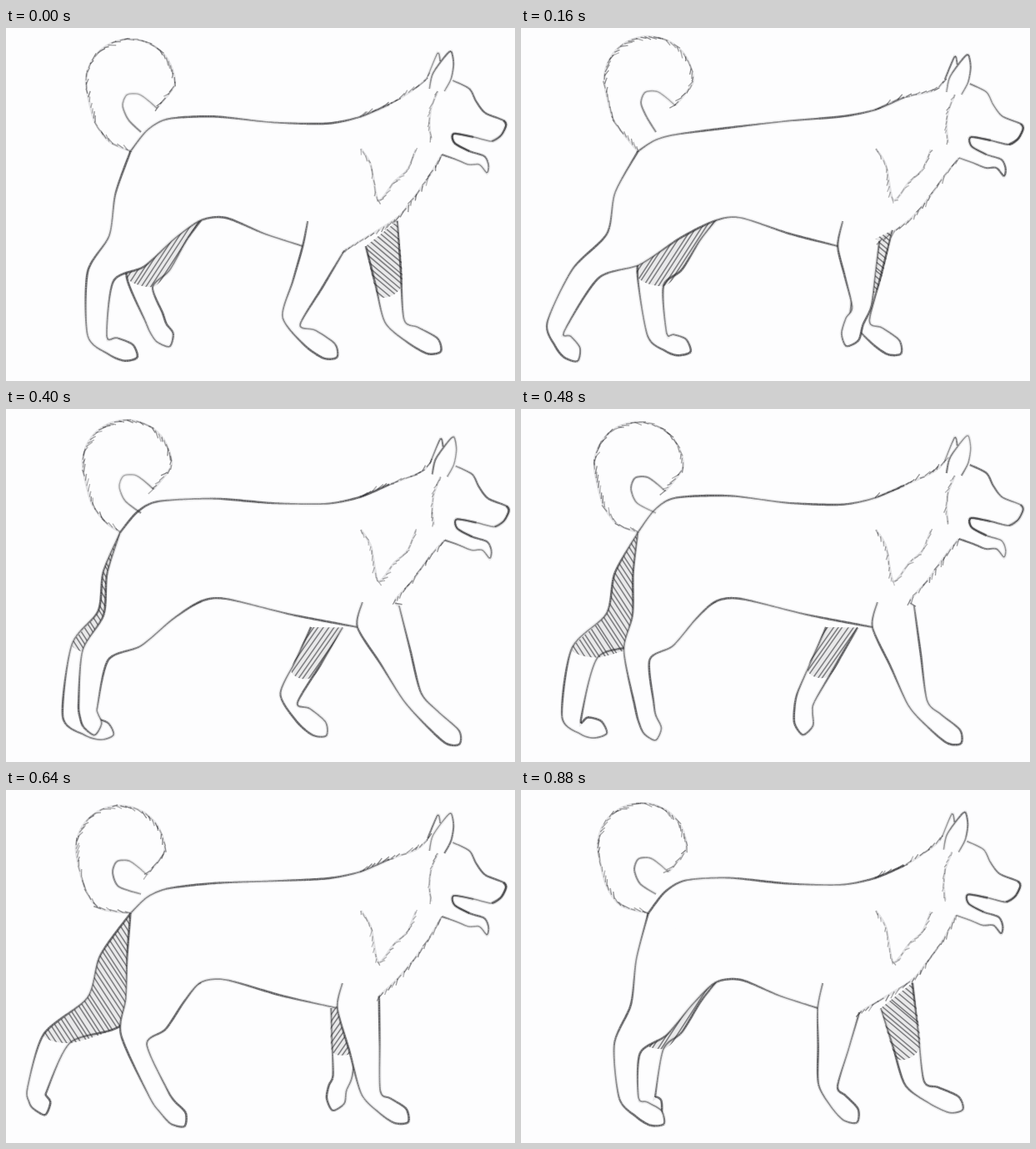
Animation, 611 px wide and 424 px high, one loop 960 ms. Source, as an HTML page with a canvas:

```html
<!DOCTYPE html>
<html lang="en">
<head>
<meta charset="utf-8">
<title>Walking dog</title>
<style>
html, body { margin: 0; width: 100%; height: 100%; overflow: hidden; background: #fdfdfe; }
canvas { display: block; }
</style>
</head>
<body>
<canvas id="stage" width="611" height="424"></canvas>
<script>
const ctx = document.getElementById('stage').getContext('2d');
const STEP = 80, STEPS = 12, PAPER = '#fdfdfe';

// Joints at steps 0, 1, 3, 5, 7, 9, 11. Fore legs: wrist, toe. Hind legs: hock, ankle, toe.
const joints = {
  fore: '343,352 388,388|342,345 300,372|477,325 490,370|488,345 536,394|466,362 503,393|411,365 444,390|369,355 396,390',
  farFore: '467,352 512,382|440,352 482,385|375,348 412,382|340,348 376,384|345,345 303,375|464,342 488,372|473,352 520,378',
  hind: '98,293 110,370 147,390|72,292 56,374 90,392|52,287 28,345 33,388|92,290 99,355 104,380|155,290 198,355 212,393|121,298 168,372 202,396|112,305 130,370 162,394',
  farHind: '145,300 178,347 191,372|158,300 188,365 218,382|122,298 140,372 168,385|79,283 80,372 118,387|43,292 42,372 66,383|48,294 32,352 20,375|140,300 150,368 160,380'
};
for (const leg in joints)
  joints[leg] = joints[leg].split('|').map(key => key.split(' ').map(p => p.split(',').map(Number)));

const mix = (a, b, t) => a + (b - a) * t;
const between = (p, q, t) => [mix(p[0], q[0], t), mix(p[1], q[1], t)];
const add = (p, q, k = 1) => [p[0] + q[0] * k, p[1] + q[1] * k];
const moved = (origin, points) => points.map(p => add(origin, p));
const wave = (step, peak, period = STEPS) => Math.cos((step - peak) / period * 2 * Math.PI);

let seed = 1;
const random = () => (seed = seed * 16807 % 2147483647) / 2147483647;

function jointsAt(leg, step) {
  const place = step ? (step + 1) / 2 : 0;
  const from = joints[leg][Math.floor(place)], to = joints[leg][Math.ceil(place)];
  return from.map((p, i) => between(p, to[i], place % 1));
}

// Unit vector from p to q, and the normal on its rear side.
function frame(p, q) {
  const length = Math.hypot(q[0] - p[0], q[1] - p[1]) || 1;
  const along = [(q[0] - p[0]) / length, (q[1] - p[1]) / length];
  return [along, [-along[1], along[0]]];
}

// Outline from the rear of the ankle, around the toes, to its front.
function paw(top, ankle, toe) {
  const [, side] = frame(top, ankle), [ahead, sole] = frame(ankle, toe);
  const middle = between(ankle, toe, 0.5);
  return [
    add(ankle, side, 12), add(middle, sole, 13), add(toe, sole, 11), add(toe, ahead, 12),
    add(toe, sole, -11), add(middle, sole, -9), add(ankle, side, -11)
  ];
}

function foreLeg([wrist, toe], elbowX, width) {
  const elbow = [elbowX, 262], chest = [elbowX + width, 270 - (elbowX - 350) * 0.47];
  const foot = paw(between(elbow, chest, 0.5), wrist, toe);
  return {
    elbow, chest,
    outline: [elbow, between(elbow, foot[0], 0.5), ...foot, between(foot[6], chest, 0.5), chest],
    shade: [elbow, between(elbow, foot[0], 0.65), between(chest, foot[6], 0.65), chest]
  };
}

function hindLeg([hock, ankle, toe], rump) {
  const front = add(hock, [31, 11]), flank = [234, 231];
  const lean = (150 - hock[0]) * 0.2;
  const rear = [rump, between(rump, hock, 0.35), add(between(rump, hock, 0.7), [lean, 0]), hock];
  const thigh = [front, add(between(front, flank, 0.35), [0, 8]), between(front, flank, 0.7), flank];
  return {
    outline: [...rear, ...paw(between(hock, front, 0.5), ankle, toe), ...thigh],
    shade: [...rear, ...thigh]
  };
}

// Cardinal spline sampled into short segments.
function smooth(points) {
  const out = [], last = points.length - 1;
  for (let i = 0; i < last; i++) {
    const a = points[Math.max(i - 1, 0)], b = points[i], c = points[i + 1], d = points[Math.min(i + 2, last)];
    const count = Math.ceil(Math.hypot(c[0] - b[0], c[1] - b[1]) / 3) || 1;
    for (let j = 0; j < count; j++) {
      const t = j / count, t2 = t * t, t3 = t2 * t;
      out.push([0, 1].map(k =>
        (2 * t3 - 3 * t2 + 1) * b[k] + (3 * t2 - 2 * t3) * c[k] +
        0.4 * ((t3 - 2 * t2 + t) * (c[k] - a[k]) + (t3 - t2) * (d[k] - b[k]))));
    }
  }
  return [...out, points[last]];
}

function trace(points) {
  ctx.beginPath();
  points.forEach(p => ctx.lineTo(...p));
}

function stroke(width, alpha) {
  ctx.lineWidth = width;
  ctx.strokeStyle = `rgba(45,45,48,${alpha})`;
  ctx.stroke();
}

function pencil(points, width = 2.1, alpha = 0.7) {
  const path = smooth(points), phase = random() * 6;
  trace(path);
  stroke(width + 2.5, 0.08);
  for (let i = 1; i < path.length; i++) {
    const press = Math.sin(i * 0.13 + phase);
    trace([path[i - 1], path[i]]);
    stroke(width * (1 + 0.2 * press), alpha * (0.85 + 0.15 * press));
  }
}

function fur(points, side = 1, alpha = 0.45, length = 8) {
  const path = smooth(points);
  trace(path);
  stroke(3, 0.12);
  for (let i = 0; i < path.length - 1; i += 2) {
    const [along] = frame(path[i], path[i + 1]);
    const angle = Math.atan2(along[1], along[0]) + side * (random() * 0.7 - 0.15);
    const reach = length * (0.7 + random() * 0.6);
    trace([path[i], add(path[i], [Math.cos(angle), Math.sin(angle)], reach)]);
    stroke(1.4, alpha * (0.7 + random() * 0.5));
  }
}

function fill(points, color = PAPER) {
  trace(points);
  ctx.closePath();
  ctx.fillStyle = color;
  ctx.fill();
}

function hatch(area, degrees) {
  ctx.save();
  fill(smooth(area), 'rgba(60,60,65,.1)');
  ctx.clip();
  ctx.translate(...between(area[0], area[area.length - 1], 0.5));
  ctx.rotate(degrees * Math.PI / 180);
  for (let y = -220; y < 220; y += 5) {
    trace([[-220, y + random() * 3], [220, y + random() * 3]]);
    stroke(1.6, 0.55);
  }
  ctx.restore();
}

function drawTail(step, rump) {
  const center = [145 + 8 * wave(step, 2), 66.5 - 4.5 * wave(step, 2.5)];
  const arc = [];
  for (let angle = 165; angle <= 380; angle += 20) {
    const a = angle * Math.PI / 180;
    arc.push([53 * Math.cos(a), 52 * Math.sin(a)]);
  }
  fur([rump, ...moved(center, [[-25, 71], [-42, 48], ...arc, [32, 31]])]);
  pencil([...moved(center, [[32, 31], [22, 22], [10, 14], [-4, 15], [-9, 28], [-2, 45]]), [162, 125]], 1.7, 0.5);
}

function drawHead(nose, ear) {
  pencil(moved(ear, [[-28, 30], [-16, 2], [-13, 12]]), 1.7, 0.6);
  const near = moved(ear, [[-26, 45], [-22, 27], [-8, 7], [0, 0], [3, 15], [0, 33], [-8, 48]]);
  fill(smooth(near));
  pencil(near, 1.7, 0.6);
  fur(moved(ear, [[-16, 48], [-24, 68], [-26, 88], [-24, 106]]), 1, 0.35, 6);

  const muzzle = moved(nose, [[-44, -43], [-36, -28], [-25, -14], [-3, -5], [0, 1], [-6, 13], [-17, 20]]);
  const mouth = moved(nose, [[-39, 15], [-63, 11], [-62, 22], [-44, 32], [-26, 38]]);
  const jaw = moved(nose, [[-21, 49], [-23, 58], [-32, 48], [-45, 48], [-60, 42], [-77, 36]]);
  pencil([add(ear, [2, 35]), ...muzzle, ...mouth, ...jaw], 1.9, 0.65);
  pencil(muzzle.slice(3), 2.2, 0.6);
  pencil(mouth.slice(0, 4), 2, 0.6);
}

function draw(step) {
  seed = 7919 * (step + 1);
  ctx.clearRect(0, 0, 611, 424);

  const bob = wave(step, 2.7, 6), sway = wave(step, 4), reach = 34 * wave(step, 5.5);
  const rump = [145 - 9 * sway, 148];
  const croup = 116.5 + 9 * bob + 5 * wave(step, 2.5), saddle = 110 - 5 * bob;
  const nose = [601.5 + 2.5 * sway, 118 + 4 * sway], ear = add(nose, [-66, -88]);

  const farHind = hindLeg(jointsAt('farHind', step), rump);
  const farFore = foreLeg(jointsAt('farFore', step), 399 - reach, 38);
  const hind = hindLeg(jointsAt('hind', step), rump);
  const fore = foreLeg(jointsAt('fore', step), 389 + reach, 50);

  hatch(farHind.shade, farHind.shade[3][0] < 110 ? 57 : -57);
  hatch(farFore.shade, farFore.elbow[0] > 400 ? 40 : -55);
  pencil(farHind.outline);
  pencil(farFore.outline);

  const body = [...hind.outline, [264, 228], add(between([264, 228], fore.elbow, 0.5), [0, 2]), fore.elbow];
  const foreOutline = [add(fore.elbow, [6, -30]), ...fore.outline];
  for (const shape of [body, foreOutline]) {
    fill(smooth(shape));
    pencil(shape);
  }

  const back = [
    rump, [rump[0] + 20, mix(148, croup, 0.65)], [rump[0] + 45, croup],
    [250, mix(croup, saddle, 0.2) - 4], [320, mix(croup, saddle, 0.75)],
    [385, saddle], [425, saddle - 8], [460, saddle - 23]
  ];
  pencil(back);
  fur([...back.slice(6), add(ear, [-41, 43]), add(ear, [-28, 31])], -1);
  drawTail(step, rump);
  fur([add(nose, [-77, 36]), [508, 178], [488, 206], [467, 230], fore.chest], -1);
  fur([[426, 145], [438, 165], [447, 207], [466, 185], [482, 170], [492, 146]], 1, 0.35, 6);
  drawHead(nose, ear);
}

let shown = -1;
function tick() {
  const step = Math.floor(performance.now() / STEP) % STEPS;
  if (step !== shown) draw(shown = step);
  requestAnimationFrame(tick);
}
tick();
</script>
</body>
</html>
```
